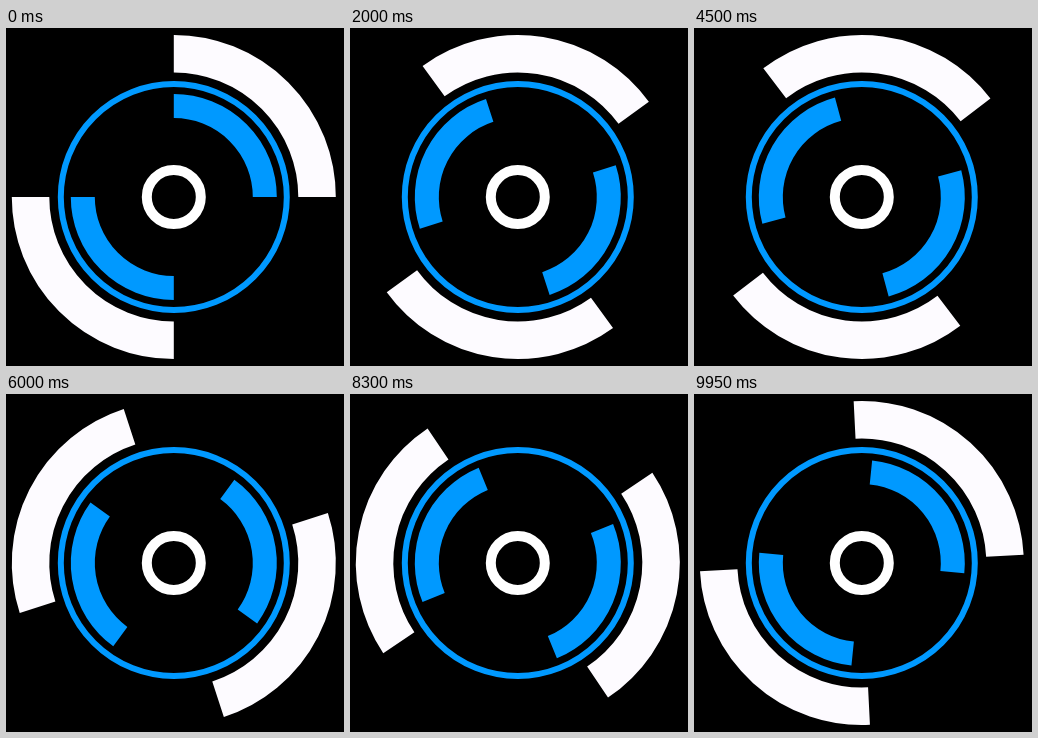
Animation, 338 px wide and 338 px high, one loop 10 s. Source, as an HTML page:

```html
<!DOCTYPE html>
<html lang="en">
<head>
<meta charset="utf-8">
<title>Rotating rings</title>
<style>
  html, body { margin: 0; width: 100%; height: 100%; overflow: hidden; background: #000; }
  svg { display: block; width: 100vw; height: 100vh; }
</style>
</head>
<body>
<svg viewBox="0 0 338 338" fill="none">
  <g transform="translate(167.8 169)">
    <circle r="27" stroke="#fff" stroke-width="10"/>
    <circle r="113" stroke="#09f" stroke-width="6"/>
    <path id="inner" stroke="#09f" stroke-width="24" d="M0-91A91 91 0 0 1 91 0M0 91A91 91 0 0 1-91 0"/>
    <path id="outer" stroke="#fdfbff" stroke-width="37.5" d="M0-143.25A143.25 143.25 0 0 1 143.25 0M0 143.25A143.25 143.25 0 0 1-143.25 0"/>
  </g>
</svg>
<script>
  const LOOP = 10000, HOLD = 50, STEP = 40;
  const DEGREES_PER_STEP = 720 * STEP / LOOP;
  const inner = document.getElementById('inner');
  const outer = document.getElementById('outer');

  function draw() {
    // Motion advances in 40 ms steps but is shown in 50 ms holds.
    const shown = Math.floor((performance.now() % LOOP) / HOLD + 1e-6);
    const angle = Math.ceil(shown * HOLD / STEP - 0.5) * DEGREES_PER_STEP;
    outer.setAttribute('transform', `rotate(${angle})`);
    inner.setAttribute('transform', `rotate(${-2 * angle})`);
    requestAnimationFrame(draw);
  }
  draw();
</script>
</body>
</html>
```
